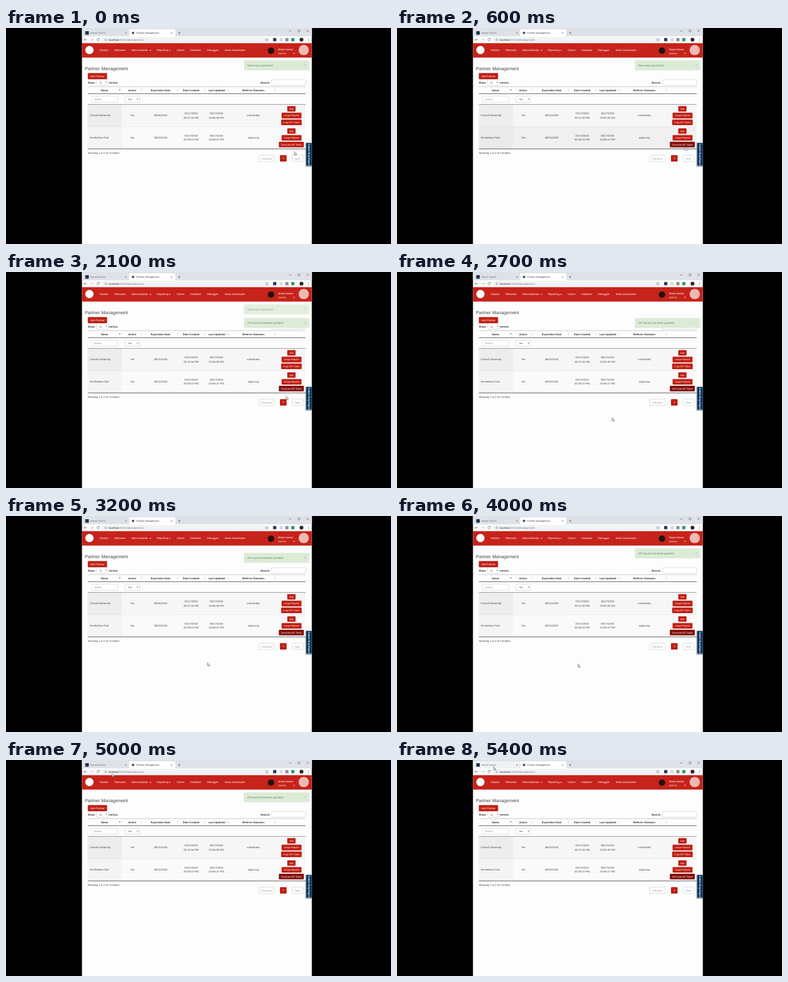
An HTML page for the animation above (5.7 s loop, 600 px wide and 338 px high).

```html
<!DOCTYPE html>
<html lang="en">
<head>
<meta charset="utf-8">
<title>Partner Management</title>
<style>
  html, body { margin: 0; width: 100%; height: 100%; overflow: hidden; background: #000; }
  svg { display: block; width: 100vw; height: 100vh; }
  text {
    font-family: "Liberation Sans", Arial, sans-serif;
    white-space: pre;
    text-rendering: geometricPrecision;
  }
</style>
</head>
<body>
<svg id="stage" viewBox="0 0 600 338"></svg>
<script>
const NS = 'http://www.w3.org/2000/svg';
const stage = document.getElementById('stage');
const RED = '#bf1f15', DARK_RED = '#82130d', INK = '#444', RULE = '#444';

function add(tag, attrs, parent = stage) {
  const node = document.createElementNS(NS, tag);
  for (const key in attrs) node.setAttribute(key, attrs[key]);
  return parent.appendChild(node);
}
const rect = (x, y, width, height, fill, more, parent) =>
  add('rect', { x, y, width, height, fill, ...more }, parent);
const path = (d, stroke, more, parent) =>
  add('path', { d, stroke, fill: 'none', 'stroke-width': .6, ...more }, parent);
const circle = (cx, cy, r, fill) => add('circle', { cx, cy, r, fill });
function text(x, y, label, more, parent) {
  const node = add('text', { x, y, fill: INK, 'font-size': 4.15, ...more }, parent);
  node.textContent = label;
  return node;
}
const mid = (x, y, label, more) => text(x, y, label, { 'text-anchor': 'middle', ...more });
const bold = { 'font-weight': 700, fill: '#333' };
const field = (x, y, w, h) => rect(x, y, w, h, '#fff', { stroke: '#ccc', 'stroke-width': .6, rx: 1 });
const caret = (x, y, fill) => add('path', { d: `M${x - 1.3} ${y}h2.6l-1.3 1.5z`, fill });
function button(x, y, w, h, label, size = 3.6) {
  const box = rect(x, y, w, h, RED, { rx: 1 });
  mid(x + w / 2, y + h / 2 + size * .35, label, { fill: '#fff', 'font-size': size });
  return box;
}

function drawBrowser() {
  rect(118.4, 0, 358.2, 338, '#fdfdfd');
  rect(118.4, 0, 358.2, 13, '#dee2e8');
  const hover = rect(119, 2, 72, 11, '#eff1f4', { rx: 1.5 });
  rect(192, 2, 72, 11.5, '#fff', { rx: 1.5 });
  rect(123.5, 5, 5.5, 5.5, '#22344f');
  circle(198, 7.8, 2, '#555');
  text(131, 9.3, 'Partner Search', { 'font-size': 3.6, fill: '#5f6368' });
  text(203, 9.3, 'Partner Management', { 'font-size': 3.8 });
  for (const x of [187, 258]) path(`M${x - 1} 6.8l2 2m0 -2l-2 2`, '#555');
  path('M268 7.8h4m-2 -2v4', '#555');
  path('M441 4.5h4M468.5 3l3 3m0 -3l-3 3M455 3h3v3h-3z', '#444', { 'stroke-width': .5 });

  path('M126 18.2h-4.5m1.8 -1.8l-1.8 1.8l1.8 1.8', '#555');
  path('M131.5 18.2h4.5m-1.8 -1.8l1.8 1.8l-1.8 1.8', '#aaa');
  path('M145.4 17a2 2 0 1 0 .2 2M145.6 15.8v1.5h-1.5', '#555');
  rect(149, 14.3, 262, 8, '#f1f3f4', { rx: 4 });
  circle(155.5, 18.2, 1.6, '#777');
  circle(155.5, 18.2, 1.1, '#f1f3f4');
  const url = text(160, 19.7, 'localhost', { fill: '#222', 'font-size': 4.1 });
  add('tspan', { fill: '#777' }, url).textContent = ':2525/admin/partners';
  path('M406.5 16l.7 1.5l1.6 .2l-1.2 1.1l.3 1.6l-1.4 -.8l-1.4 .8l.3 -1.6l-1.2 -1.1l1.6 -.2z', '#555', { 'stroke-width': .4 });
  [[416.3, '#26355c'], [426.3, '#d6d7da'], [435.3, '#8d8b9b'], [444.5, '#269b68']]
    .forEach(([x, fill]) => rect(x, 15.7, 5, 5, fill));
  circle(460.5, 18.2, 3, '#33252a');
  for (const y of [16.4, 18.2, 20]) circle(471.5, y, .5, '#555');
  return hover;
}

function drawNav() {
  rect(118.4, 23.7, 358.2, 22.6, '#c6231a');
  circle(130, 34.5, 6.5, '#fff');
  [[146, 'Studies'], [169, 'Releases'], [195, 'Administration'], [235, 'Reporting'],
   [266, 'Charts'], [287, 'Variables'], [313, 'Debugger'], [341, 'Mass Downloads']]
    .forEach(([x, label]) => text(x, 36.4, label, { fill: '#fff' }));
  caret(225, 34.5, '#fff');
  caret(255.5, 34.5, '#fff');
  circle(413, 35.5, 5, '#24110f');
  text(424, 35, 'Marla Keene', { fill: '#fff' });
  text(424, 41, '(Admin)', { fill: '#fff', 'font-size': 3.5 });
  caret(449, 39, '#fff');
  circle(464, 34.5, 8, '#eeb9b3');
}

function drawPage() {
  text(123, 66.4, 'Partner Management', { 'font-size': 7.15 });
  button(127.5, 70.5, 30, 9.8, 'Add Partner', 4.2);
  text(127.5, 86.7, 'Show', bold);
  field(141.5, 80.8, 18, 8.6);
  text(145, 86.5, '10', { 'font-size': 3.6 });
  caret(156.5, 84.3, '#555');
  text(160.5, 86.7, 'entries', bold);
  text(396.5, 86.7, 'Search:', bold);
  field(414, 80.8, 53, 8.6);

  path('M127.5 91.8H467', '#aaa');
  path('M127.5 102.8H467', RULE, { 'stroke-width': .8 });
  [[153.5, 'Name'], [196.5, 'Active'], [241, 'Expiration Date'], [288.5, 'Date Created'],
   [328.5, 'Last Updated'], [385.5, 'Referrer Domains']]
    .forEach(([x, label]) => mid(x, 98.5, label, bold));
  for (const x of [211, 267.5, 309.5, 346.5, 419.5]) {
    add('path', { d: `M${x - 1} 96.5h2l-1 -1.5zM${x - 1} 97.7h2l-1 1.5z`, fill: '#c4c4c4' });
  }
  add('path', { d: 'M176 97.3h2.6l-1.3 -1.8z', fill: '#555' });

  field(133.5, 106.7, 40.5, 9.3);
  text(137, 112.8, 'Search', { fill: '#888', 'font-size': 3.8 });
  field(185.5, 106.7, 23, 9.3);
  text(190, 112.8, 'Yes', { 'font-size': 3.8 });
  caret(205, 110.8, '#555');
}

function drawRow(top, fill, nameFill, line, name, created, updated, domain) {
  const y = top + 18.8;
  rect(127.5, top, 339.5, 34.6, fill);
  rect(127.5, top, 53, 34.6, nameFill);
  const shade = rect(127.5, top, 339.5, 34.6, '#000', { opacity: 0 });
  path(`M127.5 ${top}H467`, line);
  text(130.5, y, name);
  mid(197, y, 'Yes');
  mid(241, y, '08/31/2019');
  [[288.5, created], [328, updated]].forEach(([x, time]) => {
    mid(x, y - 3.2, '05/17/2019');
    mid(x, y + 3.2, time);
  });
  mid(385.5, y, domain);
  button(438.3, top + 2.6, 13, 8.6, 'Edit');
  button(429.5, top + 13, 31, 8.8, 'Usage Reports');
  return shade;
}

function drawFooter() {
  path('M127.5 189.2H467', RULE, { 'stroke-width': .8 });
  text(127.5, 197.2, 'Showing 1 to 2 of 2 entries');
  field(394, 199, 24, 10);
  mid(406, 205.5, 'Previous', { fill: '#999' });
  button(427, 199, 10.3, 10, '1', 4.15);
  field(446, 199, 17, 10);
  mid(454.5, 205.5, 'Next', { fill: '#999' });
  rect(466.3, 179, 10.3, 38.5, '#8794a2', { rx: 1.5, opacity: .6 });
  rect(467.8, 180, 8.8, 35.5, '#0b355f', { rx: 1 });
  mid(0, 0, 'Submit Bug Report', {
    ...bold, fill: '#fff', 'font-size': 3.75, transform: 'translate(471 198) rotate(90)'
  });
}

function makeToast(label) {
  const group = add('g', {});
  rect(371, 0, 101.3, 15, '#dcebd6', { stroke: '#d4e4ca', 'stroke-width': .4, rx: 1 }, group);
  text(376, 9, label, { fill: '#52805a', 'font-size': 4.2 }, group);
  path('M465 6l2.2 2.2m0 -2.2l-2.2 2.2', '#98ab93', { 'stroke-width': .5 }, group);
  return group;
}

const tabHover = drawBrowser();
drawNav();
drawPage();
drawRow(119.6, '#f6f6f6', '#ededed', '#666', 'Cornell University', '03:47:46 PM', '03:56:35 PM', 'cornell.edu');
const rowShade = drawRow(154.4, '#fafafa', '#f4f4f4', '#ddd', 'Fernhollow Post', '03:59:23 PM', '03:59:47 PM', 'wapo.org');
button(428.8, 143.2, 32, 8.8, 'Copy API Token');
const generate = button(425.2, 178, 39, 8.8, 'Generate API Token');
drawFooter();
const savedToast = makeToast('Save was successful!');
const grantedToast = makeToast('API access has been granted!');

const pointer = { fill: '#fff', stroke: '#333', 'stroke-width': .5 };
const arrow = add('path', { ...pointer, d: 'M0 0v5l1.2 -1l.8 1.8l.9 -.4l-.8 -1.7h1.6z' });
const hand = add('path', { ...pointer, d: 'M0 .4q.6 -.8 1.1 0v2.1l2.2 .5q.6 .2 .4 1l-.4 1.8h-2.7l-1.6 -2q.2 -.8 1 -.2z' });

// [time, x, y] of the pointer tip
const route = [[0, 449.5, 193.5], [100, 449.5, 193.5], [500, 449, 186], [2000, 449, 186],
  [2500, 387, 227.5], [2700, 335, 228], [3000, 335, 228], [3500, 282, 231.5], [4000, 282, 231.5],
  [4500, 206, 58], [4600, 202, 51], [5100, 156, 14], [5400, 150.5, 10.5], [5700, 150.5, 10.5]];

const ramp = (t, from, to) => Math.min(1, Math.max(0, (t - from) / (to - from)));
function pointerAt(t) {
  const i = route.findIndex(([time]) => time > t);
  const [t0, x0, y0] = route[i - 1], [t1, x1, y1] = route[i];
  const k = ramp(t, t0, t1);
  return [x0 + (x1 - x0) * k, y0 + (y1 - y0) * k];
}
const show = (node, alpha) => node.setAttribute('opacity', alpha);
const place = (node, x, y) => node.setAttribute('transform', `translate(${x} ${y})`);

function render(t) {
  const [x, y] = pointerAt(t);
  const onButton = x > 425 && x < 464.5 && y > 178 && y < 187;
  place(arrow, x, y);
  place(hand, x, y);
  show(arrow, onButton ? 0 : 1);
  show(hand, onButton ? 1 : 0);
  generate.setAttribute('fill', onButton || t >= 500 ? DARK_RED : RED);
  // the table redraws after the click, which drops the row's hover shade
  show(rowShade, onButton && t < 900 ? .04 : 0);
  show(tabHover, y < 13 ? 1 : 0);

  place(savedToast, 0, 50.9);
  show(savedToast, 1 - ramp(t, 2000, 2400));
  place(grantedToast, 0, 72.3 - 21.4 * ramp(t, 3000, 3300));
  show(grantedToast, ramp(t, 700, 1100) * (1 - ramp(t, 5100, 5400)));
}

const start = performance.now();
function tick() {
  const t = (performance.now() - start) % 5700;
  render(Math.floor(t / 100) * 100);
  requestAnimationFrame(tick);
}
tick();
</script>
</body>
</html>
```
